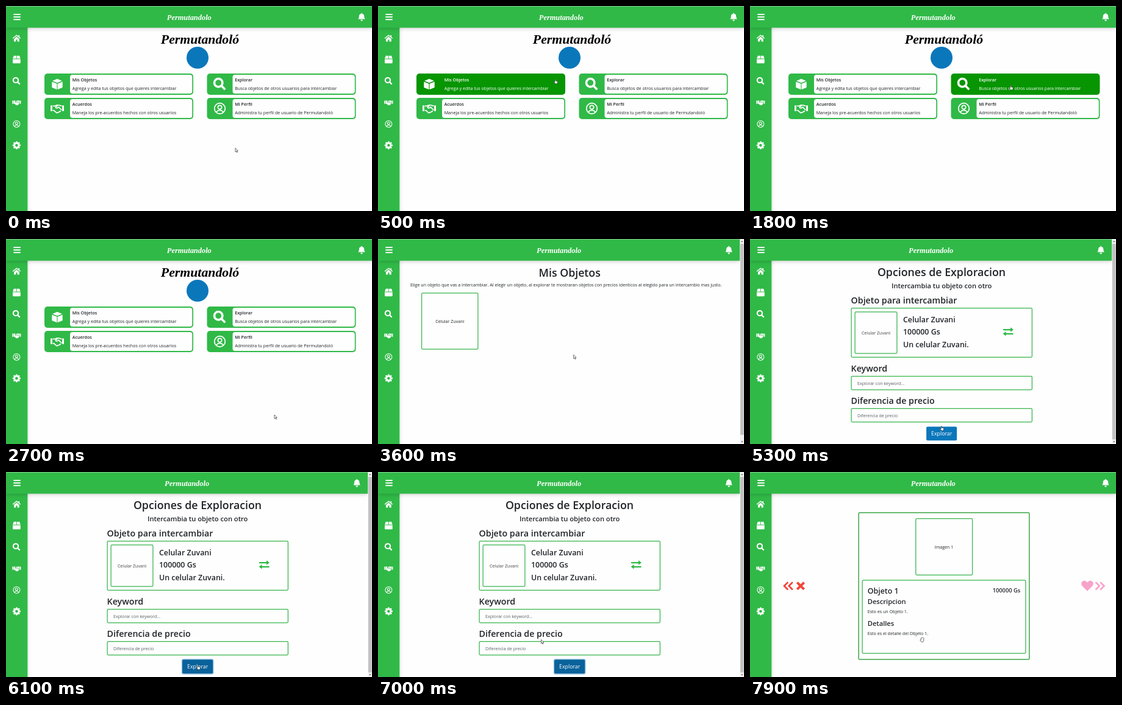
Recreate the animation shown at these times as an HTML page with a canvas. Size 600 by 337 pixels, loop 8000 ms.

```html
<!DOCTYPE html>
<html lang="es">
<head>
<meta charset="utf-8">
<title>Permutandoló</title>
<style>
  html, body { margin: 0; width: 100%; height: 100%; overflow: hidden; background: #fefefe; }
  canvas { display: block; width: 600px; height: 337px; }
</style>
</head>
<body>
<canvas id="stage"></canvas>
<script>
const W = 600, H = 337, LOOP = 8000;
const GREEN = '#30b947', DARK = '#079502', BLUE = '#0b77bb', PAGE = '#fefefe', INK = '#202428';
const SANS = '"Open Sans", "Noto Sans", sans-serif';
const SCRIPT = '"Liberation Serif", "Noto Serif", serif';
// body and heading sizes
const P = 7.12, H1 = 17.75, H2 = 14.22, H3 = 12.4, H4 = 11.15, H5 = 8.79;

const canvas = document.getElementById('stage');
const ctx = canvas.getContext('2d');
const dpr = window.devicePixelRatio || 1;
canvas.width = W * dpr;
canvas.height = H * dpr;

// Icons on a 24 unit grid: f = fill, s = stroke, w = stroke width
const ICONS = {
  home: { f: 'M4.5 14 12 7.8 19.5 14V21.5H14V16H10V21.5H4.5ZM17 3.5h3v6l-3-2.5z', s: 'M1.2 12.5 12 3.6 22.8 12.5', w: 2.5 },
  box: { f: 'M4 1h7.3v8.5H1zM12.7 1H20l3 8.5H12.7zM1 11h22V21q0 2-2 2H3q-2 0-2-2z' },
  cube: { f: 'M12 1 22 5 12 9 2 5zM1 6.8 11.3 11v12L1 19zM23 6.8 12.7 11v12L23 19z' },
  search: { s: 'M2.2 9.5a7.3 7.3 0 1 0 14.6 0a7.3 7.3 0 1 0-14.6 0M15 15l6.5 6.5', w: 3.9 },
  shake: {
    f: 'M0 6.5h3.2v10H0zM20.8 6.5H24v10h-3.2z',
    s: 'M4 7.5h4L10.5 6H15l5 1.5M12.5 6.5 9 10q1.5 2.5 4 .5l1.5-1 5.5 5.5M4 15.5h2l4.5 4q1.5.8 2.5-.6 2 .6 2.7-1.2 2 0 2-2',
    w: 1.9
  },
  deal: {
    f: 'M0 7h3v9H0zM21 7h3v9h-3zM4 7h5L7.5 11q2 3 5 .8l1.2-.8 6 4.500-1.500 2-2 1.500-2 1-3 .3L6 16H4zM20 7v7.500L14 9.800l-3 1.700q-1.500.5-1.800-.6L12.500 7z'
  },
  user: {
    s: 'M1.5 12a10.5 10.5 0 1 0 21 0a10.5 10.5 0 1 0-21 0M8.2 9.5a3.8 3.8 0 1 0 7.6 0a3.8 3.8 0 1 0-7.6 0M5.2 19.5q2-4 6.8-4t6.8 4',
    w: 2.1
  },
  bell: { f: 'M12 0q1.5 0 1.5 2.3 6 1 6 7.700 0 5 3 8.300H1.500q3-3.300 3-8.300 0-6.700 6-7.700Q10.500 0 12 0zM8.800 20h6.400q0 4-3.200 4t-3.200-4z' },
  swap: { f: 'M17 2.5l6.5 5-6.5 5zM7 11.5.5 16.5 7 21.5z', s: 'M1 7.5H18M23 16.5H6', w: 3 },
  prev: { s: 'M11 4 3 12l8 8M21 4l-8 8 8 8', w: 3.6 },
  next: { s: 'M3 4l8 8-8 8M13 4l8 8-8 8', w: 3.6 },
  cross: { s: 'M4 4 20 20M20 4 4 20', w: 5.6 },
  heart: { f: 'M12 22 2.3 12.2C-.8 9 .2 2 6 2 9 2 11 4 12 5.5 13 4 15 2 18 2 23.8 2 24.8 9 21.7 12.2Z' }
};
for (const i of Object.values(ICONS)) {
  if (i.f) i.f = new Path2D(i.f);
  if (i.s) i.s = new Path2D(i.s);
}

function icon(name, x, y, size, color = '#fff') {
  const { f, s, w } = ICONS[name];
  ctx.save();
  ctx.translate(x, y);
  ctx.scale(size / 24, size / 24);
  ctx.translate(-12, -12);
  ctx.fillStyle = ctx.strokeStyle = color;
  if (f) ctx.fill(f);
  if (s) { ctx.lineWidth = w; ctx.stroke(s); }
  ctx.restore();
}

function cog(x, y, r) {
  ctx.strokeStyle = '#fff';
  ctx.lineWidth = r * 0.44;
  ctx.beginPath();
  ctx.arc(x, y, r * 0.56, 0, 7);
  ctx.stroke();
  ctx.beginPath();
  for (let i = 0; i < 8; i++) {
    const c = Math.cos(i * Math.PI / 4), s = Math.sin(i * Math.PI / 4);
    ctx.moveTo(x + c * r * 0.6, y + s * r * 0.6);
    ctx.lineTo(x + c * r, y + s * r);
  }
  ctx.lineWidth = r * 0.4;
  ctx.stroke();
}

function text(str, x, y, size, { weight = 400, color = INK, align = 'left', font = SANS } = {}) {
  ctx.font = `${weight} ${size}px ${font}`;
  ctx.fillStyle = color;
  ctx.textAlign = align;
  ctx.fillText(str, x, y);
}
const head = (str, x, y, size, align, color) => text(str, x, y, size, { weight: 600, align, color });
const mid = (str, x, y, color = INK) => text(str, x, y, P, { align: 'center', color });

function rect(x, y, w, h, color) {
  ctx.fillStyle = color;
  ctx.fillRect(x, y, w, h);
}

function panel(x, y, w, h, r, color) {
  ctx.beginPath();
  ctx.roundRect(x, y, w, h, r);
  ctx.fillStyle = color;
  ctx.fill();
}

function frame(x, y, w, h, color = '#36b44c') {
  ctx.beginPath();
  ctx.roundRect(x + 0.6, y + 0.6, w - 1.2, h - 1.2, 1.8);
  ctx.strokeStyle = color;
  ctx.lineWidth = 1.25;
  ctx.stroke();
}

function shaded(x, y, w, h) {
  ctx.save();
  ctx.shadowColor = 'rgba(0,0,0,.22)';
  ctx.shadowBlur = 7 * dpr;
  ctx.shadowOffsetY = 1.5 * dpr;
  rect(x, y, w, h, GREEN);
  ctx.restore();
}

// thumb: lower end of the scroll thumb, 0 when the page does not scroll
function chrome(thumb) {
  const right = thumb ? 593.4 : W;
  shaded(0, 30, 35.3, H);
  shaded(0, 0, right, 35.7);
  rect(0, 0, right, 0.8, '#9bdaa6');
  for (const y of [12.9, 17.1, 21.3]) rect(12.3, y, 11.5, 1.9, '#fff');
  text('Permutandolo', thumb ? 296.6 : 300.3, 23, 12.4,
    { weight: 'italic 700', color: '#fff', align: 'center', font: SCRIPT });
  icon('bell', thumb ? 575.2 : 583, 18.1, 13.3);

  icon('home', 17.4, 53, 14);
  icon('box', 17.4, 88, 13.9);
  icon('search', 17.4, 123.3, 13.5);
  icon('deal', 17.4, 158.4, 14);
  icon('user', 17.4, 194, 12.5);
  cog(17.4, 229, 6.6);

  if (thumb) {
    rect(right, 0, W - right, H, '#f1f1f1');
    rect(right + 0.6, 8, 5.6, thumb - 8, '#c1c1c1');
    ctx.fillStyle = '#606060';
    for (const [y, d] of [[4, -1], [333.5, 1]]) {
      ctx.beginPath();
      ctx.moveTo(595, y - d);
      ctx.lineTo(598.6, y - d);
      ctx.lineTo(596.8, y + d);
      ctx.fill();
    }
  }
}

const CARDS = [
  { x: 63, y: 111, icon: 'cube', size: 19, title: 'Mis Objetos', note: 'Agrega y edita tus objetos que quieres intercambiar' },
  { x: 329.5, y: 111, icon: 'search', size: 22, title: 'Explorar', note: 'Busca objetos de otros usuarios para intercambiar' },
  { x: 63, y: 151, icon: 'shake', size: 22, title: 'Acuerdos', note: 'Maneja los pre-acuerdos hechos con otros usuarios' },
  { x: 329.5, y: 151, icon: 'user', size: 20, title: 'Mi Perfil', note: 'Administra tu perfil de usuario de Permutandoló' }
];
const inside = (p, x, y, w, h) => p.x >= x && p.x <= x + w && p.y >= y && p.y <= y + h;

// Each page draws itself and returns the pointer shape
function home(t, p) {
  let shape = 'arrow';
  text('Permutandoló', 318, 62, 21.8, { weight: 'italic 700', color: '#000', align: 'center', font: SCRIPT });
  panel(296, 67, 36, 36, 18, BLUE);
  for (const c of CARDS) {
    const over = inside(p, c.x, c.y, 244, 35);
    const color = over ? '#fff' : INK;
    if (over) shape = 'hand';
    panel(c.x, c.y, 244, 35, 5, over ? DARK : GREEN);
    if (!over) panel(c.x + 42, c.y + 2, 200.3, 31, 4, PAGE);
    icon(c.icon, c.x + 21, c.y + 17.5, c.size);
    head(c.title, c.x + 45.7, c.y + 13, P, 'left', color);
    text(c.note, c.x + 45.7, c.y + 27, P, { color });
  }
  return shape;
}

function objects(t, p) {
  head('Mis Objetos', 314.2, 61.5, H1, 'center');
  mid('Elige un objeto que vas a intercambiar. Al elegir un objeto, al explorar te mostraran objetos con precios identicos al elegido para un intercambio mas justo.', 308.3, 78);
  frame(71, 88.3, 93.5, 93.5);
  mid('Celular Zuvani', 117.8, 138);
  return inside(p, 71, 88, 94, 94) ? 'hand' : 'arrow';
}

function options(t, p) {
  head('Opciones de Exploracion', 314, 61.3, H1, 'center');
  head('Intercambia tu objeto con otro', 314.2, 80.5, H4, 'center');

  head('Objeto para intercambiar', 165.6, 106, H2);
  frame(165.5, 113, 297.5, 82);
  frame(171.5, 119.3, 70, 69.5);
  mid('Celular Zuvani', 206.5, 156.7, '#444');
  head('Celular Zuvani', 251, 137, H3);
  head('100000 Gs', 251, 157.3, H3);
  head('Un celular Zuvani.', 251, 177.5, H3);
  icon('swap', 423.3, 152.4, 18, GREEN);

  const hint = { color: '#585e64' };
  head('Keyword', 165.6, 217.5, H2);
  frame(165.5, 225, 297.5, 23.5);
  text('Explorar con keyword...', 176, 239.5, P, hint);
  head('Diferencia de precio', 165.6, 271, H2);
  frame(165.5, 278, 297.5, 23.5);
  text('Diferencia de precio', 176, 292.5, P, hint);

  const pressed = t >= 5500;
  if (pressed) panel(287.8, 307.3, 52.7, 25.4, 3, '#8fbfe0');
  panel(289.1, 308.6, 50, 22.7, 2, t >= 5350 ? '#0a629b' : BLUE);
  text('Explorar', 314.2, 323.4, H5, { color: '#fff', align: 'center' });
  return inside(p, 289, 307, 50, 24) ? 'hand' : 'arrow';
}

function result(t, p) {
  frame(177.5, 66.3, 281, 242.5, '#159420');
  frame(271.2, 76, 94, 94);
  mid('Imagen 1', 318, 125.7);
  frame(183.5, 177.3, 269, 121.3);
  head('Objeto 1', 192.7, 199.5, H3);
  head('100000 Gs', 443.2, 198, 9.3, 'right');
  head('Descripcion', 192.7, 217, H4);
  text('Esto es un Objeto 1.', 192.7, 232, P);
  head('Detalles', 192.7, 253, H4);
  text('Esto es el detalle del Objeto 1.', 192.7, 267.8, P);
  icon('prev', 63, 187.3, 18.5, '#f2453a');
  icon('cross', 83, 187.3, 17, '#f2453a');
  icon('heart', 553, 187.3, 20.5, '#f8a3c9');
  icon('next', 573.5, 187.3, 18.5, '#f8a3c9');
  return inside(p, 178, 66, 280, 242) ? 'grab' : 'arrow';
}

const PAGES = [
  { until: 3600, draw: home, thumb: 0 },
  { until: 4600, draw: objects, thumb: 322 },
  { until: 7500, draw: options, thumb: 329.5 },
  { until: LOOP, draw: result, thumb: 0 }
];

// Pointer stops: arrive, leave, x, y
const STOPS = [
  [0, 100, 376, 233.5], [450, 950, 290, 120], [1450, 1900, 426.8, 130],
  [2500, 2950, 440, 289], [3400, 3700, 320.7, 190.3], [4200, 4600, 120, 137],
  [5250, 5320, 313.3, 307.2], [5480, 6300, 314, 317], [6900, 7450, 267.5, 275.5],
  [7800, LOOP, 281.8, 271.5]
];

function pointer(t) {
  let n = 0;
  while (n < STOPS.length - 1 && t >= STOPS[n + 1][0]) n++;
  const [, leave, x, y] = STOPS[n], to = STOPS[n + 1];
  if (!to || t <= leave) return { x, y };
  const k = (t - leave) / (to[0] - leave), e = k * k * (3 - 2 * k);
  return { x: x + (to[2] - x) * e, y: y + (to[3] - y) * e };
}

const SHAPES = {
  arrow: new Path2D('M0 0V6.3L1.5 5 2.5 7.3 3.5 6.8 2.5 4.6H4.4Z'),
  hand: new Path2D('M0 .7Q.6-.3 1.2.7V3L3.5 3.4Q4.5 3.6 4.4 4.8L3.8 7.8H.6L-1.5 5Q-1.3 4 0 5Z'),
  grab: new Path2D('M-1.5 1.5Q-.9.6-.3 1.3 0 .2.8.9 1.5.2 2 1.3 3 .9 3 2.2V5.5L2 7.8H-.8L-3 4.8Q-2.7 3.8-1.5 4.7Z')
};

function drawPointer({ x, y }, shape) {
  ctx.save();
  ctx.translate(x, y);
  ctx.fillStyle = '#fff';
  ctx.strokeStyle = '#333';
  ctx.lineWidth = 0.7;
  ctx.fill(SHAPES[shape]);
  ctx.stroke(SHAPES[shape]);
  ctx.restore();
}

function render(t) {
  ctx.setTransform(dpr, 0, 0, dpr, 0, 0);
  rect(0, 0, W, H, PAGE);
  const page = PAGES.find(q => t < q.until);
  const p = pointer(t);
  chrome(page.thumb);
  drawPointer(p, page.draw(t, p));
}

const start = performance.now();
function tick() {
  render((performance.now() - start) % LOOP);
  requestAnimationFrame(tick);
}
tick();
</script>
</body>
</html>
```
